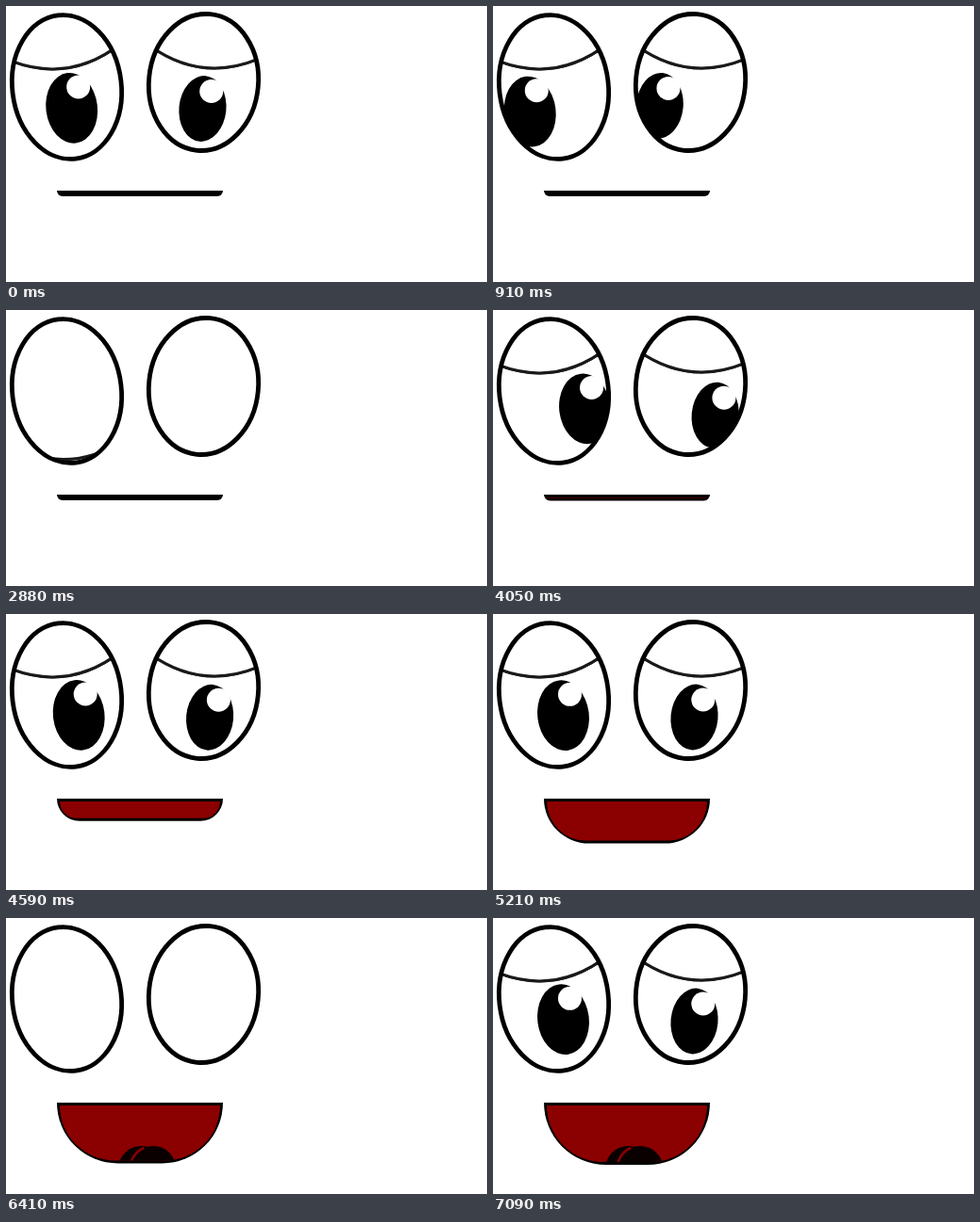
An HTML page with a canvas for the animation above (8 s loop, 510 by 293 pixels).

```html
<!DOCTYPE html>
<html lang="en">
<head>
<meta charset="utf-8">
<title>Blinking face</title>
<style>
  html, body { margin: 0; width: 100%; height: 100%; overflow: hidden; background: #fff; }
  canvas { display: block; }
</style>
</head>
<body>
<canvas id="stage" width="510" height="293"></canvas>
<script>
const ctx = document.getElementById('stage').getContext('2d');
const LOOP = 8000;
const STEP = 68.9;
const LID_TRAVEL = 140;
const BLINKS = [2480, 5480];
const TAU = Math.PI * 2;

const EYES = [
  { x: 64.5, y: 86, rx: 57.8, ry: 76.7, tilt: -7, lid: -20,
    pupil: { x: 74.5, y: 107.7, rx: 27.3, ry: 37.5 }, shine: { x: 81.5, y: 85.3 },
    left: -35.5, right: 24 },
  { x: 209.5, y: 81, rx: 58, ry: 72.6, tilt: 5.5, lid: -15.5,
    pupil: { x: 213.5, y: 109.5, rx: 25, ry: 35 }, shine: { x: 222.8, y: 91 },
    left: -37, right: 23 }
];

// time, x, y of the passing pointer
const POINTER = [
  [3140, 158, -2], [3484, 350, 208], [3553, 388, 249],
  [3700, 388, 249], [3760, 404, 265], [3829, 420, 282]
];

// cubic-bezier(.25, .1, .25, 1)
function ease(p) {
  if (p <= 0) return 0;
  if (p >= 1) return 1;
  const curve = (a, b, s) => 3 * a * s * (1 - s) ** 2 + 3 * b * s * s * (1 - s) + s ** 3;
  let lo = 0, hi = 1;
  for (let i = 0; i < 24; i++) {
    const mid = (lo + hi) / 2;
    if (curve(0.25, 0.25, mid) < p) lo = mid; else hi = mid;
  }
  return curve(0.1, 1, lo);
}

const mix = (a, b, p) => a + (b - a) * p;

// The animation advances in short steps, restarted after each pause.
function stepped(t) {
  const start = t < 1900 ? 0 : t < 4050 ? 1900 : 4050;
  return start + Math.floor((t - start) / STEP + 0.2) * STEP;
}

function gaze(eye, t) {
  if (t < 1875) return mix(0, eye.left, ease((t + 125) / 1000));
  if (t < 4000) return mix(eye.left, eye.right, ease((t - 1875) / 1000));
  return mix(eye.right, 0, ease((t - 4000) / 1000));
}

function lidDrop(t) {
  const start = BLINKS.find(b => t >= b && t < b + 1000);
  return start === undefined ? 0 : LID_TRAVEL * ease((t - start) / 1000);
}

function ellipse(x, y, rx, ry, tilt = 0) {
  ctx.beginPath();
  ctx.ellipse(x, y, rx, ry, tilt, 0, TAU);
}

function drawEye(eye, t) {
  const tilt = eye.tilt * Math.PI / 180;
  const look = gaze(eye, t);
  const dx = look * Math.cos(tilt), dy = look * Math.sin(tilt);
  const { pupil, shine } = eye;

  ctx.save();
  ellipse(eye.x, eye.y, eye.rx - 1.5, eye.ry - 1.5, tilt);
  ctx.clip();
  ctx.fillStyle = '#000';
  ellipse(pupil.x + dx, pupil.y + dy, pupil.rx, pupil.ry, tilt);
  ctx.fill();
  ctx.fillStyle = '#fff';
  ellipse(shine.x + dx, shine.y + dy, 12.5, 12.5);
  ctx.fill();

  ctx.translate(eye.x, eye.y);
  ctx.rotate(tilt);
  const apex = eye.lid + lidDrop(t);
  ctx.beginPath();
  ctx.moveTo(-75, apex - 27);
  ctx.quadraticCurveTo(0, apex + 27, 75, apex - 27);
  ctx.strokeStyle = '#1a1a1a';
  ctx.lineWidth = 3;
  ctx.stroke();
  ctx.lineTo(75, -200);
  ctx.lineTo(-75, -200);
  ctx.fill();
  ctx.beginPath();
  ctx.moveTo(-75, apex - 27);
  ctx.quadraticCurveTo(0, apex + 27, 75, apex - 27);
  ctx.stroke();
  ctx.restore();

  ctx.strokeStyle = '#000';
  ctx.lineWidth = 4.8;
  ellipse(eye.x, eye.y, eye.rx, eye.ry, tilt);
  ctx.stroke();
}

function bowl(x, y, w, h) {
  ctx.beginPath();
  ctx.roundRect(x, y, w, h, [0, 0, h, h]);
}

function drawMouth(t) {
  const open = 60 * ease((t - 4000) / 3000);
  ctx.fillStyle = '#000';
  bowl(54, 196, 176, open + 6);
  ctx.fill();
  if (open <= 0) return;

  ctx.save();
  bowl(57, 199, 170, open + 0.01);
  ctx.clip();
  ctx.fillStyle = ctx.strokeStyle = '#8b0000';
  ctx.fillRect(54, 196, 176, 70);
  ctx.fillStyle = '#0a0000';
  ellipse(143.5, 266.5, 24.5, 24.5);
  ctx.fill();
  ellipse(156, 266.5, 24.5, 24.5);
  ctx.fill();
  ctx.beginPath();
  ctx.arc(156, 266.5, 24.5, Math.PI, Math.PI * 1.37);
  ctx.lineWidth = 2.5;
  ctx.stroke();
  ctx.restore();
}

function drawPointer(t) {
  if (t < POINTER[0][0] || t > 3890) return;
  let i = 0;
  while (i < POINTER.length - 2 && t >= POINTER[i + 1][0]) i++;
  const [t0, x0, y0] = POINTER[i], [t1, x1, y1] = POINTER[i + 1];
  const p = Math.min(1, (t - t0) / (t1 - t0));
  ctx.save();
  ctx.translate(Math.round(mix(x0, x1, p)) + 0.5, Math.round(mix(y0, y1, p)) + 0.5);
  const arrow = new Path2D('M0 0V16L4 12.5L6.5 18H8.5L6 11.5H11Z');
  ctx.fillStyle = '#fff';
  ctx.fill(arrow);
  ctx.strokeStyle = '#000';
  ctx.lineWidth = 1;
  ctx.stroke(arrow);
  ctx.restore();
}

function draw(now) {
  const t = stepped(now % LOOP);
  ctx.fillStyle = '#fff';
  ctx.fillRect(0, 0, 510, 293);
  EYES.forEach(eye => drawEye(eye, t));
  drawMouth(t);
  drawPointer(t);
}

let begin;
function tick(now) {
  begin ??= now;
  draw(now - begin);
  requestAnimationFrame(tick);
}
draw(0);
requestAnimationFrame(tick);
</script>
</body>
</html>
```
